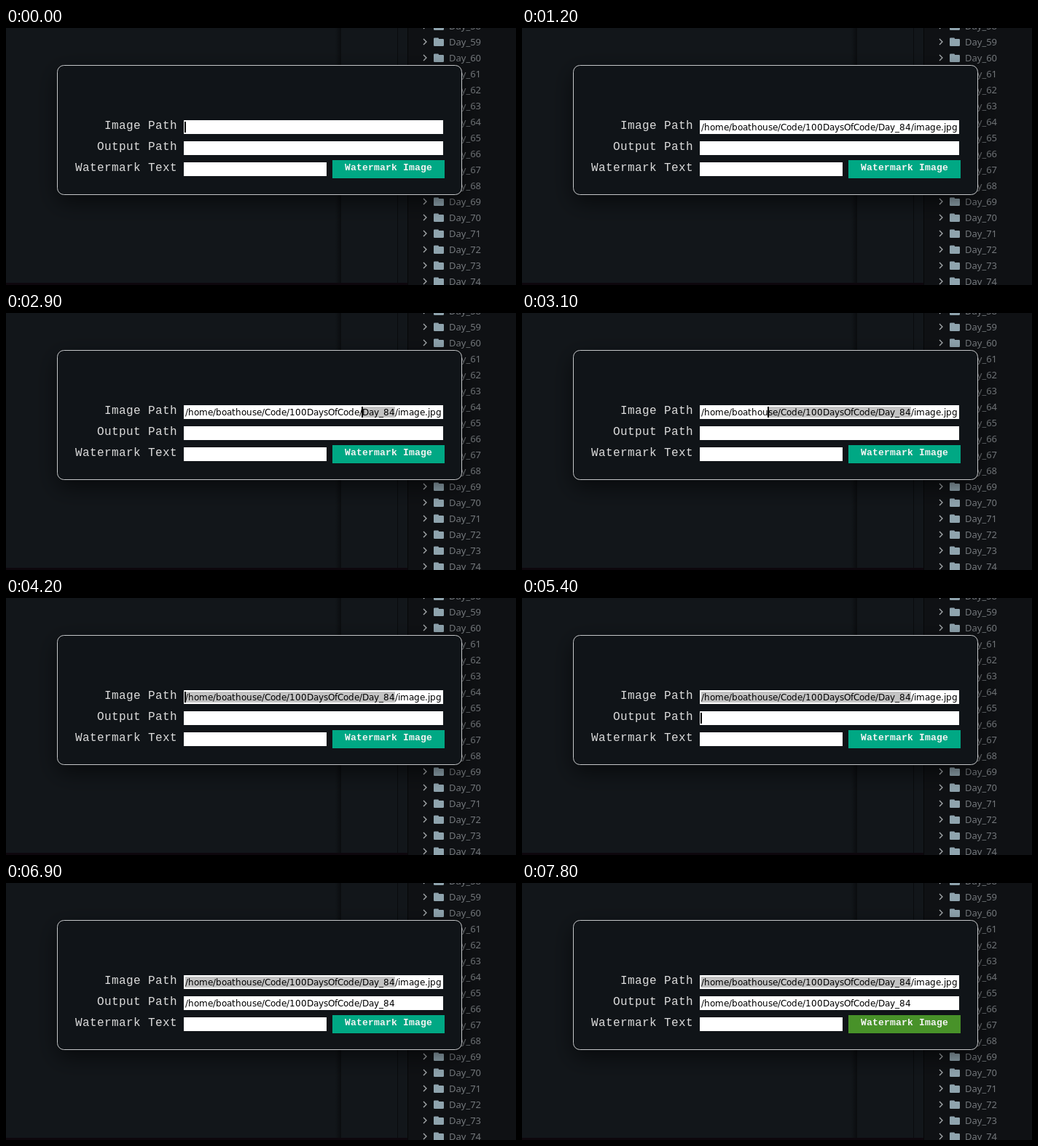
Recreate the animation shown at these times as an HTML page with a canvas. Size 700x354 px, loop 8000 ms.

```html
<!DOCTYPE html>
<html lang="en">
<head>
<meta charset="utf-8">
<title>Watermark form</title>
<style>
  html, body { margin: 0; width: 100%; height: 100%; overflow: hidden; background: #12161a; }
  canvas { display: block; }
</style>
</head>
<body>
<canvas id="stage" width="700" height="354"></canvas>
<script>
const ctx = document.getElementById('stage').getContext('2d');
const LOOP = 8000;
const LABEL_FONT = '16px "Liberation Mono", monospace';
const BUTTON_FONT = 'bold 13px "Liberation Mono", monospace';
const ENTRY_FONT = '12px "DejaVu Sans", sans-serif';
const TREE_FONT = '13px "Noto Sans", sans-serif';

const folder = '/home/boathouse/Code/100DaysOfCode/Day_84';
const imagePath = folder + '/image.jpg';
const END = imagePath.length;
const SLASH = folder.length;
const DAY = folder.indexOf('Day_');
const TEXT_X = 246;
const ROW_Y = [127, 156, 185];

// Caret states: [start time, row, character index]; no row means hidden.
const carets = [
  [0, 0, 0], [200], [500, 0, END], [1200], [1500, 0, END], [2100], [2400, 0, END],
  [2700, 0, SLASH], [2900, 0, DAY], [3000, 0, 25], [3100, 0, 13], [3200, 0, 4],
  [3300, 0, 0], [3900], [4200, 0, 0], [4800], [5100, 0, 0],
  [5400, 1, 0], [6000], [6300, 1, SLASH], [6900], [7200, 1, SLASH], [7800]
];

function rect(x, y, w, h, color) {
  ctx.fillStyle = color;
  ctx.fillRect(x, y, w, h);
}

const advance = ch => Math.round(ctx.measureText(ch).width);
const widthOf = text => [...text].reduce((sum, ch) => sum + advance(ch), 0);

// Whole-pixel advances, as in a classic desktop toolkit.
function gridText(text, x, y, font, color) {
  ctx.font = font;
  ctx.fillStyle = color;
  for (const ch of text) {
    ctx.fillText(ch, x, y);
    x += advance(ch);
  }
}

function caretX(index) {
  ctx.font = ENTRY_FONT;
  return TEXT_X + widthOf(imagePath.slice(0, index));
}

function drawTreeRow(day, y) {
  ctx.strokeStyle = '#a9adb0';
  ctx.lineWidth = 1.3;
  ctx.beginPath();
  ctx.moveTo(573, y - 4);
  ctx.lineTo(577, y);
  ctx.lineTo(573, y + 4);
  ctx.stroke();

  ctx.fillStyle = '#8fa4ae';
  ctx.beginPath();
  ctx.roundRect(587, y - 5.5, 7, 6, 1.2);
  ctx.roundRect(587, y - 4, 14, 10, 1.3);
  ctx.fill();

  ctx.font = TREE_FONT;
  ctx.fillStyle = '#73777b';
  ctx.fillText('Day_' + day, 608, y + 5);
}

function drawBackdrop() {
  rect(0, 0, 700, 354, '#12161a');
  const fade = ctx.createLinearGradient(452, 0, 460, 0);
  fade.addColorStop(0, 'rgba(8,10,12,0)');
  fade.addColorStop(1, 'rgba(8,10,12,.8)');
  rect(452, 0, 8, 354, fade);
  rect(537, 0, 1, 354, '#090b0d');
  rect(551, 0, 149, 354, '#0f1114');
  rect(551, 0, 1, 354, '#060708');
  for (let day = 58; day <= 74; day++) drawTreeRow(day, 19 + (day - 59) * 22);
  rect(0, 351, 551, 3, '#0d070d');
}

function drawDialog(time) {
  ctx.save();
  ctx.shadowColor = 'rgba(0,0,0,.55)';
  ctx.shadowBlur = 30;
  ctx.shadowOffsetY = 10;
  ctx.fillStyle = '#101418';
  ctx.beginPath();
  ctx.roundRect(70.5, 51.5, 555, 178, 9);
  ctx.fill();
  ctx.restore();
  ctx.strokeStyle = '#c4c6c8';
  ctx.lineWidth = 1;
  ctx.stroke();

  ['Image Path', 'Output Path', 'Watermark Text'].forEach((label, i) => {
    ctx.font = LABEL_FONT;
    gridText(label, 235 - widthOf(label), ROW_Y[i] + 12, LABEL_FONT, '#dcdcdc');
    rect(244, ROW_Y[i], i < 2 ? 356 : 196, 19, '#fff');
  });

  rect(448, 182, 154, 25, time < 7000 ? '#00a884' : '#489229');
  gridText('Watermark Image', 465, 196, BUTTON_FONT, '#f4f4f4');
}

function drawEntries(time) {
  const active = carets.filter(c => c[0] <= time);
  const [, row, index] = active[active.length - 1];

  if (time >= 2900) {
    const start = Math.min(...active.filter(c => c[1] === 0 && c[0] >= 2700).map(c => c[2]));
    const left = caretX(start);
    rect(left, ROW_Y[0] + 2, caretX(SLASH) - left, 15, '#c3c3c3');
  }
  if (row !== undefined) rect(caretX(index) - 1, ROW_Y[row] + 2, 2, 15, '#000');
  if (time >= 200) gridText(imagePath, TEXT_X, ROW_Y[0] + 14, ENTRY_FONT, '#000');
  if (time >= 6000) gridText(folder, TEXT_X, ROW_Y[1] + 14, ENTRY_FONT, '#000');
}

function render(now) {
  const time = now % LOOP;
  drawBackdrop();
  drawDialog(time);
  drawEntries(time);
}

const startTime = performance.now();
function tick() {
  render(performance.now() - startTime);
  requestAnimationFrame(tick);
}
tick();
</script>
</body>
</html>
```
